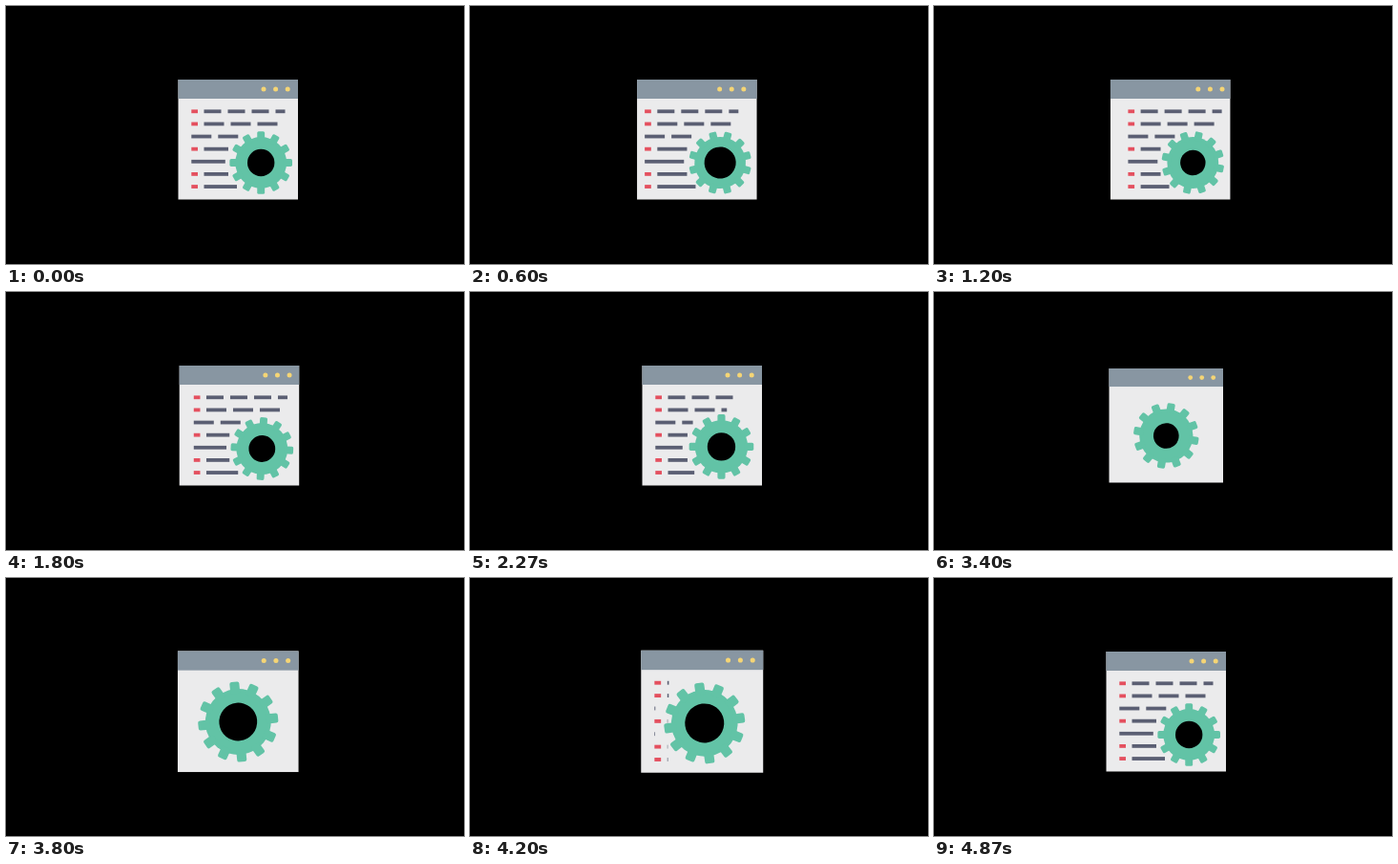
Recreate the animation shown at these times as an HTML page with a canvas. Size 480 px wide and 270 px high, loop 4990 ms.

```html
<!DOCTYPE html>
<html lang="en">
<head>
<meta charset="utf-8">
<title>Code window with gear</title>
<style>
  html, body { margin: 0; width: 100%; height: 100%; overflow: hidden; background: #000; }
  canvas { display: block; width: 100%; height: 100%; }
</style>
</head>
<body>
<canvas id="stage"></canvas>
<script>
const LOOP = 4990, STEPS_PER_BEAT = 10, STEP = 1000 / 15, LAST_STEP = 73;
const COLOR = {
  page: '#ebebec', header: '#8896a2', dot: '#f5d575', marker: '#e4505f',
  bar: '#5b5f73', gear: '#62c3a6', hole: '#000'
};
const SIDE = 125.5, LEFT = 180.5, TOP = 77;
const BAR_GAP = 7, ROW_GAP = 13.12;

// Bar widths, row by row.
const ROWS = [[18, 18, 18, 10], [21, 21, 21], [21, 21], [25.5], [35.5], [25.5], [34.5]];

const canvas = document.getElementById('stage');
const ctx = canvas.getContext('2d');

// Eased step from 0 to 1 between two beats.
function ramp(beat, from, to) {
  const u = Math.min(1, Math.max(0, (beat - from) / (to - from)));
  return u * u * (3 - 2 * u);
}

// Rises to 1 at the given beat and falls back within the next one.
const bump = (beat, peak) => ramp(beat, peak - 1, peak) - ramp(beat, peak, peak + 1);

function rect(x, y, w, h, color) {
  ctx.fillStyle = color;
  ctx.fillRect(x, y, w, h);
}

function disc(x, y, r, color) {
  ctx.fillStyle = color;
  ctx.beginPath();
  ctx.arc(x, y, r, 0, Math.PI * 2);
  ctx.fill();
}

function drawRows(sway, barAmount, markerAmount) {
  const margin = LEFT + 13.8 + sway * 11.5;
  ROWS.forEach((widths, i) => {
    const y = TOP + 31.4 + i * ROW_GAP;
    const indented = i !== 2 && i !== 4;
    if (indented) rect(margin, y, 6.7 * markerAmount, 3.8, COLOR.marker);

    // Rows beside the gear stretch so that their ends follow the window.
    const stretch = i > 2 ? -sway * 5.8 : 0;
    const total = widths.reduce((sum, w) => sum + w + BAR_GAP, stretch - BAR_GAP);
    let x = 0;
    for (const w of widths) {
      const visible = Math.min(w + stretch, total * barAmount - x);
      if (visible > 0) rect(margin + (indented ? 13.2 : 0) + x, y, visible, 3.8, COLOR.bar);
      x += w + BAR_GAP;
    }
  });
}

function drawGear(x, y, radius, hole, degrees) {
  ctx.save();
  ctx.translate(x, y);
  ctx.rotate(degrees * Math.PI / 180);
  disc(0, 0, radius * 0.82, COLOR.gear);
  for (let i = 0; i < 12; i++) {
    ctx.beginPath();
    ctx.roundRect(radius * 0.7, -radius * 0.12, radius * 0.3, radius * 0.24, radius * 0.05);
    ctx.fill();
    ctx.rotate(Math.PI / 6);
  }
  disc(0, 0, hole, COLOR.hole);
  ctx.restore();
}

function draw(beat) {
  const swayLeft = bump(beat, 1), swayRight = bump(beat, 2);
  const shrink = bump(beat, 5), grow = bump(beat, 6);
  const sway = swayRight - swayLeft;
  const centered = ramp(beat, 3.2, 4) - ramp(beat, 6.1, 7.1);
  const bars = 1 - ramp(beat, 3.2, 3.9) + ramp(beat, 6.22, 7.2);
  const markers = 1 - ramp(beat, 3.8, 4) + ramp(beat, 6, 6.2);
  const scale = 1 - 0.05 * shrink + 0.025 * grow;
  const left = LEFT + sway * 5.6;
  const midX = LEFT + SIDE / 2, midY = TOP + SIDE / 2;

  rect(0, 0, 480, 270, '#000');
  ctx.save();
  ctx.translate(midX, midY);
  ctx.scale(scale, scale);
  ctx.translate(-midX, -midY);
  rect(left, TOP, SIDE, SIDE, COLOR.page);
  rect(left, TOP, SIDE, 20, COLOR.header);
  for (let i = 0; i < 3; i++) disc(270 + i * 12.6 + sway * 8.6, TOP + 10, 2.5, COLOR.dot);
  drawRows(sway, bars, markers);
  ctx.restore();

  drawGear(
    267.2 - 23.9 * centered + sway * 5.2,
    164 - 13.5 * centered,
    32.8 + 6.4 * centered - 5.2 * shrink + 5 * grow,
    14.2 + 3.1 * centered + 2.4 * swayLeft - 1.4 * swayRight - 4.2 * shrink + 4.5 * grow,
    15 * sway + 10 * (shrink - grow)
  );
}

function resize() {
  const ratio = window.devicePixelRatio || 1;
  canvas.width = innerWidth * ratio;
  canvas.height = innerHeight * ratio;
  ctx.setTransform(canvas.width / 480, 0, 0, canvas.height / 270, 0, 0);
}

let startTime;
function tick(now) {
  startTime ??= now;
  const t = Math.max(0, now - startTime) % LOOP;
  draw(Math.min(LAST_STEP, Math.floor((t + 4) / STEP)) / STEPS_PER_BEAT);
  requestAnimationFrame(tick);
}

addEventListener('resize', resize);
resize();
draw(0);
requestAnimationFrame(tick);
</script>
</body>
</html>
```
